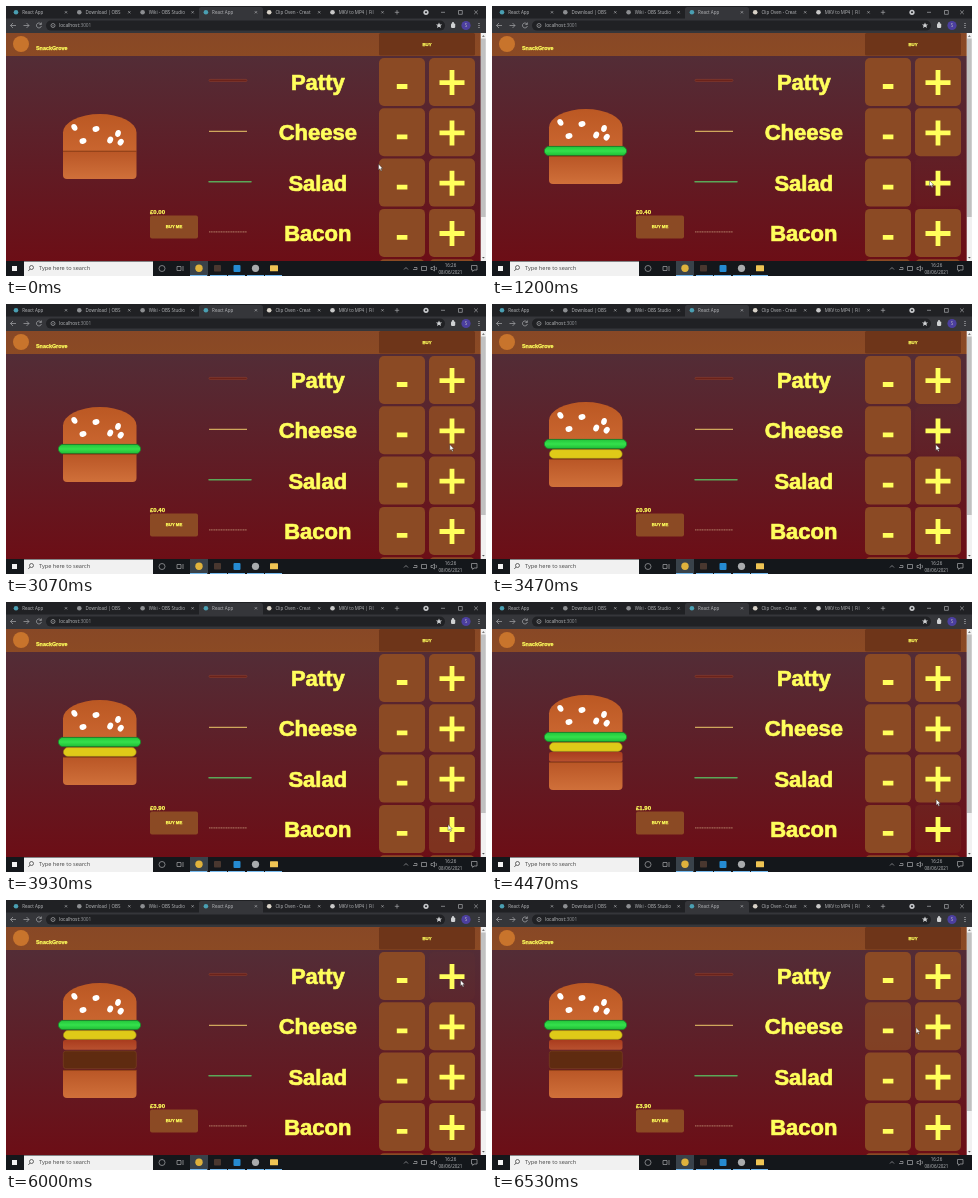
An HTML page that plays this animation: 480x270 px, repeating every 6.59 s.

```html
<!DOCTYPE html>
<html lang="en">
<head>
<meta charset="utf-8">
<title>Burger builder</title>
<style>
  html, body { margin: 0; width: 100%; height: 100%; overflow: hidden; background: #202124; }
  svg { display: block; width: 480px; height: 270px; }
  text { font-family: "Open Sans", sans-serif; font-size: 4.5px; fill: #b9bbbe; }
  .heavy { font: bold 4.3px "Liberation Sans", Arial, sans-serif; fill: #ffff5c; stroke: #ffff5c; stroke-width: .25; }
  .label { font-size: 22px; stroke-width: .7; }
  .mid { text-anchor: middle; }
  .icon { fill: none; stroke: #a6a8ab; stroke-width: .7; }
</style>
</head>
<body>
<svg viewBox="0 0 480 270">
  <defs>
    <linearGradient id="page" x2="0" y2="1"><stop stop-color="#50303a"/><stop offset="1" stop-color="#6c0e16"/></linearGradient>
    <linearGradient id="head" x2="0" y2="1"><stop stop-color="#884826"/><stop offset="1" stop-color="#8b4a24"/></linearGradient>
    <linearGradient id="bun" x2="0" y2="1"><stop stop-color="#bb5823"/><stop offset="1" stop-color="#c9652f"/></linearGradient>
    <linearGradient id="base" x2="0" y2="1"><stop stop-color="#b95626"/><stop offset="1" stop-color="#d0703a"/></linearGradient>
    <linearGradient id="leaf" x2="0" y2="1"><stop stop-color="#22c53a"/><stop offset=".5" stop-color="#35e04c"/><stop offset="1" stop-color="#1fbd35"/></linearGradient>
    <linearGradient id="rasher" x2="0" y2="1"><stop stop-color="#a93c1e"/><stop offset="1" stop-color="#b9512f"/></linearGradient>
  </defs>

  <g id="browser"></g>

  <rect y="27" width="475" height="228" fill="url(#page)"/>
  <rect y="27" width="475" height="23" fill="url(#head)"/>
  <rect x="373" y="27" width="96" height="22.5" rx="1.5" fill="#6e3519"/>
  <text class="heavy mid" x="421" y="39.8">BUY</text>
  <circle cx="15" cy="38" r="8" fill="#c8742c"/>
  <text class="heavy" x="30" y="44.2" style="font-size:5.4px">SnackGrove</text>

  <rect x="203" y="73.4" width="38" height="2" rx="1" fill="#692018" stroke="#8b4030" stroke-width=".6"/>
  <path d="M203 125.4h38" stroke="#cfa75c" stroke-width="1.3"/>
  <path d="M203 175.7h42" stroke="#5aa858" stroke-width="1.5" stroke-linecap="round"/>
  <path d="M203 225.9h38" stroke="#a36a58" stroke-width="1.3" stroke-dasharray="1.2 .5"/>
  <g id="rows"></g>

  <text id="price" class="heavy" x="144" y="207.9" style="font-size:6px"></text>
  <rect x="144" y="209.5" width="48" height="23" rx="2" fill="#8b4a24"/>
  <text class="heavy mid" x="168" y="222.4">BUY ME</text>

  <g id="top">
    <path d="M57 37V18.5A36.75 18.5 0 0 1 130.5 18.5V37Z" fill="url(#bun)"/>
    <g id="seeds" fill="#fff"></g>
  </g>
  <rect id="salad" x="52.4" y=".4" width="82.2" height="9.2" rx="4.6" fill="url(#leaf)" stroke="#178a2a" stroke-width=".8"/>
  <rect id="cheese" x="57.4" y=".6" width="72.8" height="8.8" rx="4.4" fill="#dfca18" stroke="#a08a1a" stroke-width=".6"/>
  <rect id="bacon" x="57" width="73.5" height="9.8" rx="2" fill="url(#rasher)"/>
  <rect id="patty" x="57.3" y="1" width="73" height="17.6" rx="2.5" fill="#5f2b10" stroke="#7d4420" stroke-width=".6"/>
  <g id="bottom">
    <path d="M57 0H130.5V24Q130.5 28 126.5 28H61Q57 28 57 24Z" fill="url(#base)"/>
    <path d="M57 .2h73.5" stroke="#70300f" stroke-width=".7"/>
  </g>

  <g id="scrollbar"></g>
  <g id="taskbar"></g>
  <path id="cursor" d="M0 0V6L1.4 4.8L2.4 7L3.4 6.5L2.4 4.4H4.2Z" fill="#fff" stroke="#222" stroke-width=".4"/>
</svg>

<script>
const LOOP = 6590, FADE = 250;
const $ = id => document.getElementById(id);
const text = (x, y, s, attrs = '') => `<text x="${x}" y="${y}" ${attrs}>${s}</text>`;
const dot = (x, y, r, fill) => `<circle cx="${x}" cy="${y}" r="${r}" fill="${fill}"/>`;
const box = (x, y, w, h, fill, rx = 0) => `<rect x="${x}" y="${y}" width="${w}" height="${h}" rx="${rx}" fill="${fill}"/>`;
const line = d => `<path class="icon" d="${d}"/>`;
const cross = (x, y, r) => line(`M${x - r} ${y - r}l${2 * r} ${2 * r}m0 ${-2 * r}l${-2 * r} ${2 * r}`);

// Browser tabs and toolbar
const tabs = [
  ['React App', '#4a9fb2'], ['Download | OBS', '#8c8e91'], ['Wiki - OBS Studio', '#8c8e91'],
  ['React App', '#4a9fb2'], ['Clip Oven - Creat', '#d8d2c8'], ['MKV to MP4 | Fil', '#c8c8c8']
];
$('browser').innerHTML = box(0, 0, 480, 27, '#202124') + box(0, 12.5, 480, 14.5, '#35363a') +
  box(193, 1, 64, 14, '#35363a', 2.5) +
  tabs.map(([name, color], i) => {
    const x = 10 + 63.3 * i;
    return dot(x, 6.3, 2.3, color) + text(x + 6.2, 8, name) + cross(x + 50, 6.3, 1.1);
  }).join('') +
  line('M388.8 6.3h4.4M391 4.1v4.4') +
  dot(420, 6.3, 2.6, '#c6c8cb') + dot(420, 6.3, 1, '#202124') +
  line('M435 6.3h4M452.5 4.5h3.8v3.8h-3.8z') + cross(470, 6.3, 1.8) +
  line('M10 19.5H4.5M7 17l-2.5 2.5L7 22M17.5 19.5H23M20.5 17l2.5 2.5L20.5 22') +
  line('M35 18a2.5 2.5 0 1 0 .4 2M35.4 16.5v2h-2') +
  box(40, 14.6, 399, 10, '#202124', 5) +
  line('M49 19.5a2 2 0 1 0-4 0a2 2 0 1 0 4 0M47 19v1.3') +
  text(53, 21.3, 'localhost<tspan fill="#94979b">:3001</tspan>', 'style="font-size:4.8px"') +
  `<path d="M433 16.4l.9 2h2.2l-1.7 1.4.6 2.2-2-1.3-2 1.3.6-2.2-1.7-1.4h2.2z" fill="#d0d2d4"/>` +
  box(445, 17.5, 4.2, 4.4, '#d0d2d4', .8) + dot(447, 17.2, 1.1, '#d0d2d4') +
  dot(460, 19.5, 4.6, '#4c3fa0') + text(460, 21.2, 'S', 'class="mid"') +
  [17.5, 19.5, 21.5].map(y => dot(473, y, .6, '#d0d2d4')).join('');

$('scrollbar').innerHTML = box(474.7, 27, 5.3, 228, '#f1f1f1') + box(475, 32.5, 4.7, 178.5, '#c1c1c1') +
  '<path d="M476 30.8l1.4-1.6 1.4 1.6zM476 251l1.4 1.6 1.4-1.6z" fill="#555"/>';

// Desktop taskbar
$('taskbar').innerHTML = box(0, 255, 480, 15, '#14171b') +
  box(6, 260, 5, 5, '#f2f2f2') + box(18, 255.5, 129, 14.5, '#f1f1f1') +
  '<path d="M27.5 261.5a2 2 0 1 0-4 0a2 2 0 1 0 4 0M24 263l-1.7 2" fill="none" stroke="#333" stroke-width=".7"/>' +
  text(33, 264.4, 'Type here to search', 'style="fill:#444;font-size:5.6px"') +
  line('M159 262.5a3 3 0 1 0-6 0a3 3 0 1 0 6 0M171 260.5h4v4h-4zM177 260v5') +
  box(184, 255, 18, 15, '#39424a') +
  dot(193, 262.3, 3.7, '#dfb23c') + box(208, 259, 7, 6.5, '#49372f', .8) +
  box(227.5, 259, 7, 7, '#258bd2', 1) + dot(249.5, 262.3, 3.6, '#a9abad') +
  box(264, 259.3, 8, 6, '#efc454', .6) +
  [184, 204, 222, 241, 259].map(x => box(x, 269, 17, 1, '#76b9ed')).join('') +
  line('M398 263.5l2-2 2 2M407 263.5h4v-2h-3M415.5 260.5h5v4h-5zM425 261.5h1.5l2-1.5v5l-2-1.5H425zM430 261q1 1.5 0 3') +
  text(444.5, 260.8, '16:26', 'class="mid"') +
  text(444.5, 267.8, '08/06/2021', 'class="mid"') +
  line('M465.5 259.5h5.5v4.5h-3l-1.3 1.4v-1.4h-1.2z');

// Ingredient rows: label, minus button, plus button
const rowY = i => 52 + 50.3 * i;
const buttons = [];
$('rows').innerHTML = ['Patty', 'Cheese', 'Salad', 'Bacon', ''].map((name, i) => {
  const y = rowY(i);
  const pads = [373, 423].map(x => {
    buttons.push({ x, y });
    return `<rect class="pad" x="${x}" y="${y}" width="46" height="48" rx="5" fill="#8b4a24"/>`;
  }).join('');
  return text(311.8, y + 32, name, 'class="heavy label mid"') + pads +
    `<path d="M390.8 ${y + 28.5}h10.6M433.5 ${y + 24.6}h25M446 ${y + 12.1}v25" stroke="#ffff5c" stroke-width="4.8"/>`;
}).join('');
document.querySelectorAll('.pad').forEach((el, i) => buttons[i].el = el);

$('seeds').innerHTML = [[68.4, 13.4, -30], [90, 15, 75], [77, 27, 75], [104.2, 26, 25], [112, 19.5, 15], [114.7, 28.2, 35]]
  .map(([x, y, a]) => `<ellipse cx="${x}" cy="${y}" rx="2.8" ry="3.5" transform="rotate(${a} ${x} ${y})"/>`).join('');

// Cursor path: time, x, y
const path = [
  [0, 372.5, 158], [70, 372.5, 158], [300, 400, 165], [550, 437.5, 174.5], [1730, 437.5, 174.5],
  [2250, 421, 176], [2900, 421, 150], [3010, 421, 148], [3070, 443.8, 140.5], [3600, 443.8, 140.5],
  [3650, 444, 152], [3700, 443, 201], [3820, 443, 204], [3930, 442, 222.5], [4400, 442, 222.5],
  [4800, 454.5, 80], [6200, 454.5, 80], [6300, 428, 96], [6380, 421, 112], [6420, 405, 122],
  [6470, 410, 126], [6530, 424, 127.5], [LOOP, 424, 127.5]
];
function cursorAt(t) {
  t = Math.max(0, t);
  const i = Math.max(1, path.findIndex(p => p[0] >= t));
  const [t0, x0, y0] = path[i - 1], [t1, x1, y1] = path[i];
  const k = (t - t0) / (t1 - t0);
  return [x0 + (x1 - x0) * k, y0 + (y1 - y0) * k];
}

// Fill order from top to bottom: id, height, time added, price in pence
const layers = [
  ['top', 37, 0, 0], ['salad', 10, 800, 40], ['cheese', 10, 3350, 50],
  ['bacon', 10, 4150, 100], ['patty', 20, 5300, 200], ['bottom', 28, 0, 0]
];

function draw(t) {
  const shown = layers.filter(l => t >= l[2]);
  let y = 140.5 - shown.reduce((sum, l) => sum + l[1], 0) / 2;
  for (const layer of layers) {
    const [id, height] = layer, on = shown.includes(layer);
    $(id).setAttribute('visibility', on ? 'visible' : 'hidden');
    if (!on) continue;
    $(id).setAttribute('transform', `translate(0 ${y})`);
    y += height;
  }
  $('price').textContent = '£' + (shown.reduce((sum, l) => sum + l[3], 0) / 100).toFixed(2);

  // A button fades by the share of the last FADE ms spent over it
  const steps = 25;
  const trail = Array.from({ length: steps }, (_, i) => cursorAt(t - i * FADE / steps));
  for (const b of buttons) {
    const over = trail.filter(([x, y]) => x >= b.x && x < b.x + 46 && y >= b.y && y < b.y + 48).length / steps;
    b.el.setAttribute('fill-opacity', 1 - .94 * over * over);
  }
  $('cursor').setAttribute('transform', `translate(${cursorAt(t)})`);
}

const start = performance.now();
function frame() {
  draw((performance.now() - start) % LOOP);
  requestAnimationFrame(frame);
}
frame();
</script>
</body>
</html>
```
